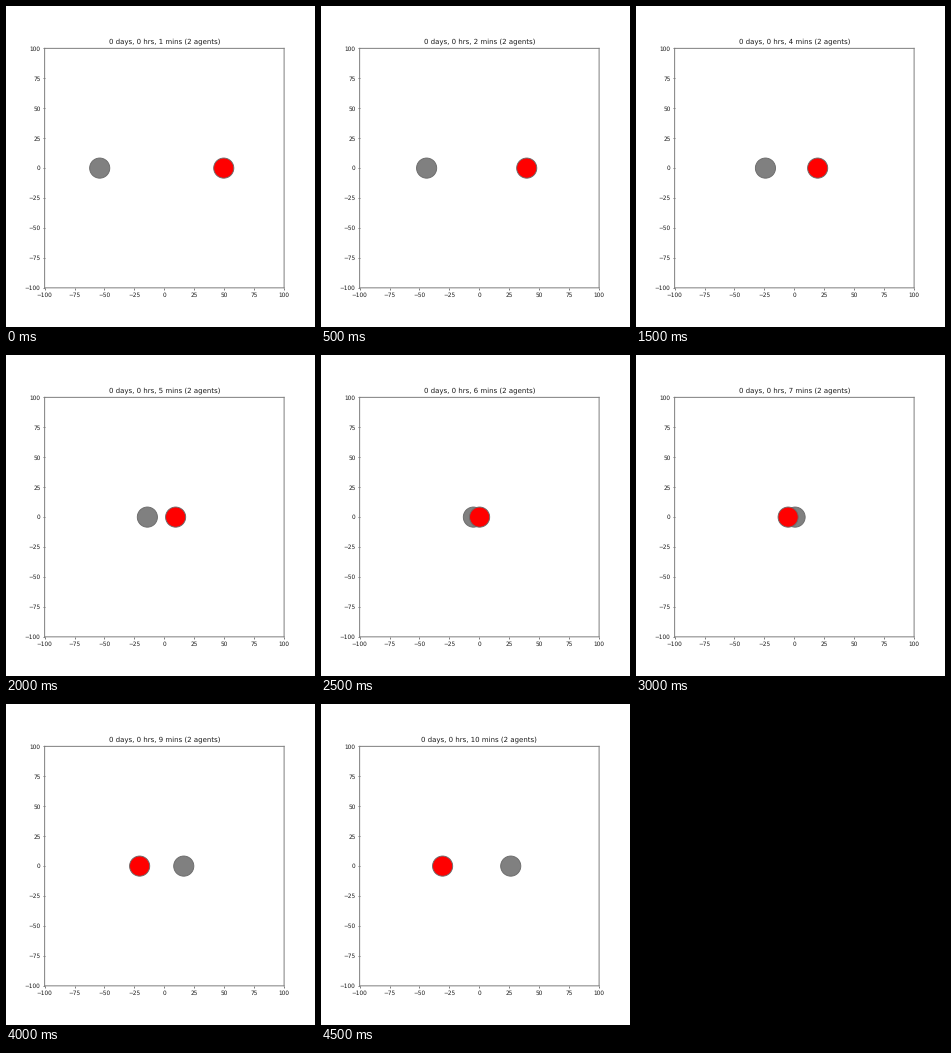
These frames come from a looping animation (309 px wide and 321 px high, 5 s). A matplotlib script:

```python
import numpy as np
import matplotlib.pyplot as plt
from matplotlib.animation import FuncAnimation
from matplotlib.patches import Circle

FRAMES, INTERVAL = 10, 500
RADIUS = 8.4
SCALE = 5 / 12  # shrinks the default text and line sizes to the small stage
LINE, LINE_WIDTH = "0.5", 0.72  # soft lines, one pixel wide

plt.rcParams.update({
    "font.family": "DejaVu Sans",
    "font.size": 10 * SCALE,
    "text.hinting": "none",
    "axes.linewidth": LINE_WIDTH,
    "axes.edgecolor": LINE,
    "axes.titlepad": 3.2,
})
for axis, pad in ("x", 2.0), ("y", 3.5 * SCALE):
    plt.rcParams.update({
        f"{axis}tick.major.size": 3.5 * SCALE,
        f"{axis}tick.major.width": LINE_WIDTH,
        f"{axis}tick.major.pad": pad,
        f"{axis}tick.color": LINE,
        f"{axis}tick.labelcolor": "0.1",
    })

# Each agent walks 10 units a minute and slows down while they pass each other.
MINUTES = [0, 4, 5, 6, 7, 9]
GREY_X = [-54, -14.2, -5, 0.6, 6.2, 26.2]
RED_X = [49.6, 9.4, 0.2, -5.2, -10.6, -30.7]

fig = plt.figure(figsize=(3.09, 3.21), dpi=100, facecolor="white")
ax = fig.add_subplot()
ax.set_aspect("equal")
ax.set(xlim=(-100, 100), ylim=(-100, 100))
ticks = range(-100, 101, 25)
ax.set_xticks(ticks)
ax.set_yticks(ticks)
for spine in ax.spines.values():
    spine.set_snap(False)
title = ax.set_title("", fontsize=12 * SCALE, color="0.1")


def add_agent(color, z):
    dot = Circle((0, 0), RADIUS, fc=color, ec="0.42", lw=0.65, zorder=z)
    return ax.add_patch(dot)


grey = add_agent("gray", 3)
red = add_agent("red", 4)


def update(i):
    grey.center = np.interp(i, MINUTES, GREY_X), 0
    red.center = np.interp(i, MINUTES, RED_X), 0
    title.set_text(f"0 days, 0 hrs, {i + 1} mins (2 agents)")
    return grey, red, title


anim = FuncAnimation(fig, update, frames=FRAMES, interval=INTERVAL,
                     init_func=lambda: update(0), repeat=True, repeat_delay=0)
plt.show()
```
